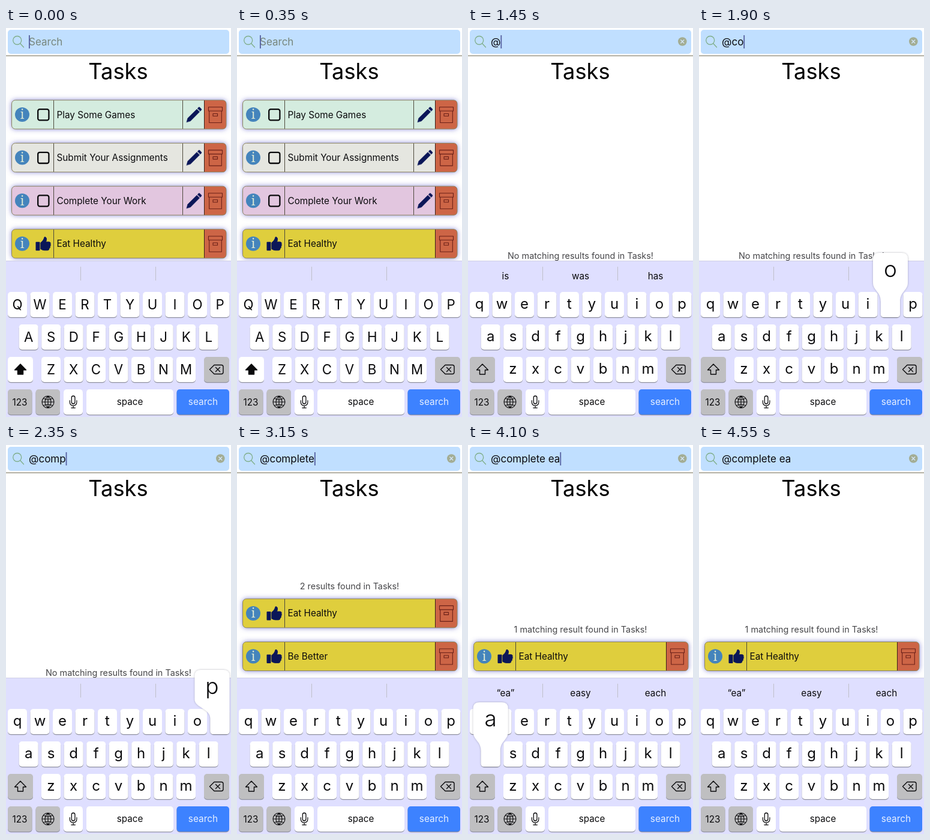
These frames come from a looping animation (375x647 px, 4.6 s). An HTML page:

```html
<!DOCTYPE html>
<html lang="en">
<head>
<meta charset="utf-8">
<title>Task search</title>
<style>
  html, body { margin: 0; width: 100%; height: 100%; overflow: hidden; background: #fff; }
  svg { display: block; }
  text { font-family: Inter, "Open Sans", sans-serif; white-space: pre; }
</style>
</head>
<body>
<svg id="stage" width="375" height="647" viewBox="0 0 375 647">
  <defs>
    <filter id="glow" x="-10%" y="-50%" width="120%" height="200%">
      <feDropShadow dx="0" dy="0" stdDeviation="4.5" flood-color="#6464c8" flood-opacity=".85"/>
    </filter>
    <filter id="lift" x="-20%" y="-20%" width="140%" height="140%">
      <feDropShadow dx="0" dy="0" stdDeviation="1.5" flood-color="#555566" flood-opacity=".45"/>
    </filter>
  </defs>
  <g id="view"></g>
</svg>
<script>
const LOOP = 4600, POP = 130, PITCH = 71.6;
const KEY = '#bfbfc1', NAVY = '#0b1658', DARK = '#0a0a0c';
const view = document.getElementById('view');
const pen = document.createElement('canvas').getContext('2d');

const tasks = [
  { name: 'Play Some Games', fill: '#d4ecdf' },
  { name: 'Submit Your Assignments', fill: '#e5e6e0' },
  { name: 'Complete Your Work', fill: '#e2c6df' },
  { name: 'Eat Healthy', fill: '#dfce3e', done: true },
  { name: 'Be Better', fill: '#dfce3e', done: true }
];

const layouts = {
  upper: ['QWERTYUIOP', 'ASDFGHJKL', 'ZXCVBNM'],
  lower: ['qwertyuiop', 'asdfghjkl', 'zxcvbnm'],
  num: ['1234567890', '-/:;()₹&@”', '.,?!’']
};

const suggestions = {
  '@': ['is', 'was', 'has'],
  '@complete ': ['I', 'you', 'I’m'],
  '@complete e': ['“e”', 'every', 'even'],
  '@complete ea': ['“ea”', 'easy', 'each']
};

// Input steps: at = start time, then the state that holds until the next step.
const steps = [
  { at: 0, text: '', layout: 'upper' },
  { at: 400, text: '', layout: 'num' },
  { at: 650, text: '', layout: 'num', pop: '@', hold: 200 },
  { at: 850, text: '@', layout: 'num' },
  { at: 1100, text: '@', layout: 'lower' }
];
const strokes = [1600, 1850, 2050, 2270, 2470, 2650, 2800, 2950, 3450, 3900, 4050];
[...'complete ea'].forEach((c, i) => steps.push({
  at: strokes[i], text: '@complete ea'.slice(0, i + 2), layout: 'lower', pop: c, hold: POP
}));

const rect = (x, y, w, h, fill, r = 0, more = '') =>
  `<rect x="${x}" y="${y}" width="${w}" height="${h}" rx="${r}" fill="${fill}" ${more}/>`;
const path = (d, stroke, width = 1.5, fill = 'none') =>
  `<path d="${d}" stroke="${stroke}" stroke-width="${width}" fill="${fill}" stroke-linejoin="round" stroke-linecap="round"/>`;
const circle = (x, y, r, fill, more = '') => `<circle cx="${x}" cy="${y}" r="${r}" fill="${fill}" ${more}/>`;
const label = (s, x, y, size, fill = DARK, anchor = 'middle', more = '') =>
  `<text x="${x}" y="${y}" font-size="${size}" fill="${fill}" text-anchor="${anchor}" ${more}>${s.replace('&', '&amp;')}</text>`;

function searchBar(text, caret) {
  pen.font = '17px Inter, "Open Sans", sans-serif';
  const x = 38 + pen.measureText(text).width;
  return rect(3, 3, 369, 40, '#c0dfff', 5)
    + circle(18.7, 20.5, 7, 'none', 'stroke="#7fae8a" stroke-width="1.3"')
    + path('M24 26l5.5 6', '#7fae8a', 1.3)
    + label(text || 'Search', 38, 28.8, 17, text ? DARK : '#77867c', 'start')
    + (caret ? rect(x, 12, 1.8, 22, '#5560a0') : '')
    + (text ? circle(357.3, 22.5, 7.3, '#a3ad94') + path('M354.8 20l5 5m0-5l-5 5', '#d4e6fa', 1.3) : '')
    + rect(0, 45.6, 375, 1.2, '#85806c');
}

function card({ name, fill, done }, cy) {
  const shape = rect(9.5, -24, 357.5, 48, fill, 6, 'filter="url(#glow)"');
  const info = circle(27, 0, 12, '#4484bc')
    + `<text x="27" y="7.3" font-size="21" fill="#d8e6d4" text-anchor="middle" font-weight="500" style="font-family:'Noto Serif',serif">i</text>`;
  const thumb = rect(49.5, -3, 7, 14.5, NAVY, 1)
    + path('M58 -2 C61 -4 63 -7 64 -11 Q66 -12 67.5 -9 Q68 -6 66.5 -3 H72 Q75 -2.5 74 .5 Q75 2.5 73.5 4.5 Q74 7 72 8 Q72 11 69 11 H64 Q61 11 58 9Z', NAVY, .8, NAVY);
  const box = rect(53.2, -8.8, 18.2, 18.2, 'none', 3, `stroke="${DARK}" stroke-width="2.3"`);
  const pencil = rect(294, -24, 1, 48, '#4d493c')
    + path('M301 12.5l1.8-6.5L318 -9l4.6 4.6L307.5 10.7Z', NAVY, .5, NAVY)
    + path('M319.3 -10.3l1.6-1.7q1-1 2 0l2.6 2.6q1 1 0 2l-1.6 1.7Z', NAVY, .5, NAVY);
  const archive = path('M330.5 -24H361q6 0 6 6V18q0 6-6 6H330.5Z', 'none', 0, '#cd6546')
    + rect(330, -24, 1, 48, '#3a211a')
    + path('M337.5 -12.5h23v6.5h-23ZM338.7 -6h20.6v19.5h-20.6ZM345 -1.5h7.5v4H345Z', '#6b2018', 1.1);
  return `<g transform="translate(0 ${cy})">${shape}${info}${done ? thumb : box}`
    + rect(79, -24, 1, 48, '#4d493c') + (done ? '' : pencil) + archive
    + rect(9.5, -24, 357.5, 48, 'none', 6, 'stroke="#8c8560" stroke-width="1"')
    + label(name, 84.5, 5.5, 15.3, DARK, 'start') + '</g>';
}

function results(text) {
  if (!text) return tasks.slice(0, 4).map((task, i) => card(task, 144 + PITCH * i)).join('');
  const query = text.match(/^@complete(.*)/);
  const found = query ? tasks.filter(t => t.done && t.name.toLowerCase().includes(query[1].trim())) : [];
  const n = found.length;
  const message = n > 1 ? `${n} results` : n ? '1 matching result' : 'No matching results';
  return label(`${message} found in Tasks!`, 187.5, 383.5 - PITCH * n, 14.4, '#454548')
    + found.map((task, i) => card(task, 351.5 - PITCH * (n - 1 - i))).join('');
}

const key = (x, y, w, fill = '#fff') =>
  rect(x, y + 1.2, w, 42, '#9192a0', 5) + rect(x, y, w, 42, fill, 5);

function popup(c, x, y) {
  const l = Math.max(3, Math.min(x - 13, 314.5)), r = l + 58;
  const d = `M${l} ${y - 55}q0-10 10-10h38q10 0 10 10V${y - 16}C${r} ${y - 2} ${x + 32} ${y - 1} ${x + 32} ${y + 16}`
    + `V${y + 37}q0 5-5 5h-22q-5 0-5-5V${y + 16}C${x} ${y - 1} ${l} ${y - 2} ${l} ${y - 16}Z`;
  return `<g filter="url(#lift)">${path(d, 'none', 0, '#fff')}</g>`
    + label(c, l + 29, y - 25, 37, DARK, 'middle', 'font-weight="300"');
}

function keyboard(text, layout, pop) {
  const num = layout === 'num', upper = layout === 'upper', lower = layout === 'lower';
  let out = rect(0, 387, 375, 260, '#dfdfff') + rect(0, 387, 375, 1, '#cfcfe6')
    + rect(124, 397, 1, 23, '#bfbfca') + rect(249, 397, 1, 23, '#bfbfca');
  let top = '';
  (suggestions[text] || []).forEach((word, i) => out += label(word, 62.5 + 125 * i, 417.5, 15.3));

  layouts[layout].forEach((chars, row) => {
    const wide = num && row === 2;
    const start = row === 2 ? 59 : row === 1 && !num ? 21.7 : 3;
    const pitch = wide ? 52.7 : 37.5, w = wide ? 46.5 : 32, y = 439 + 54 * row;
    [...chars].forEach((c, i) => {
      const x = start + pitch * i;
      out += key(x, y, w);
      if (c === pop) top = popup(c, x, y);
      else out += label(c, x + w / 2, y + (lower ? 28 : 29), lower ? 24 : 22.3);
    });
  });

  out += key(3, 547, 42, upper ? '#fff' : KEY) + key(330, 547, 42, KEY)
    + (num ? label('#+=', 24, 573, 12.3) : path('M24 559l9.5 9.7h-5v7.3h-9v-7.3h-5Z', DARK, 1.4, upper ? DARK : 'none'))
    + path('M347 560.5h12q3 0 3 3v9q0 3-3 3h-12l-7.5-7.5ZM349.5 564.5l7 7m0-7l-7 7', DARK, 1.4);

  out += key(3, 601, 40.5, KEY) + key(49.5, 601, 40.5, KEY) + key(96, 601, 32)
    + key(134, 601, 145) + key(284.5, 601, 87.5, '#3d82ff')
    + (num ? label('ABC', 23, 626.5, 13.8) : label('123', 23, 627.5, 15.2))
    + path('M60 622a10 10 0 1 0 20 0a10 10 0 1 0-20 0ZM60 622h20M70 612v20M70 612q-10 10 0 20q10-10 0-20M62.3 616q7.7 4 15.4 0M62.3 628q7.7-4 15.4 0', DARK, 1.1)
    + rect(109.3, 612, 5.6, 13, 'none', 2.8, `stroke="${DARK}" stroke-width="1.3"`)
    + path('M106.3 619.5v2.5q0 6 5.8 6q5.8 0 5.8-6v-2.5M112.1 628v3.8M108.8 631.8h6.6', DARK, 1.2)
    + label('space', 206.5, 627, 15.2) + label('search', 328.5, 627, 15.4, '#e6efff');
  return out + top;
}

let shown = '';
function draw() {
  const t = performance.now() % LOOP;
  const step = steps.filter(s => s.at <= t).pop();
  const age = t - step.at;
  const pop = age < step.hold ? step.pop : '';
  const html = searchBar(step.text, age % 1000 < 500)
    + label('Tasks', 187, 84.5, 36.3, '#000')
    + results(step.text) + keyboard(step.text, step.layout, pop);
  if (html !== shown) view.innerHTML = shown = html;
  requestAnimationFrame(draw);
}
draw();
</script>
</body>
</html>
```
